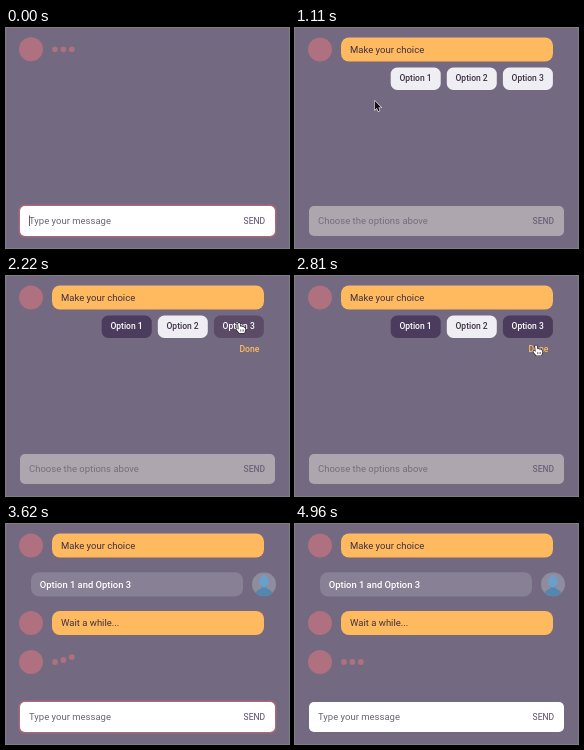
An HTML page with a canvas for the animation above (5960 ms loop, 283x220 px).

```html
<!DOCTYPE html>
<html lang="en">
<head>
<meta charset="utf-8">
<title>Chat choice</title>
<style>
  html, body { margin: 0; width: 100%; height: 100%; overflow: hidden; background: #736980; }
  canvas { display: block; width: 283px; height: 220px; }
</style>
</head>
<body>
<canvas id="stage"></canvas>
<script>
const W = 283, H = 220, LOOP = 5960;
const canvas = document.getElementById('stage');
const ctx = canvas.getContext('2d');
const ratio = Math.max(1, window.devicePixelRatio || 1);
canvas.width = W * ratio;
canvas.height = H * ratio;

const C = {
  bg: '#736980', orange: '#ffba5f', mauve: '#af7080', ink: '#3d3145',
  grey: '#888095', option: '#efeef2', hover: '#dfdbe3',
  picked: '#4b3b5d', pickedHover: '#5b4b67'
};

// Key moments, in ms
const T = { ask: 520, enter: 810, pick1: 1340, leave1: 1640, over3: 2040,
            pick3: 2220, leave3: 2510, overDone: 2810, reply: 2980,
            cursorOff: 3110, blur: 4900, still: 4960 };
const STEP = 1980 / 31;

const clamp = v => Math.max(0, Math.min(1, v));
const ease = v => v * v * (3 - 2 * v);
const stepped = (t, start, step) => Math.floor((t - start + 0.5) / step) * step;

function box(x, y, w, h, r, color) {
  ctx.fillStyle = color;
  ctx.beginPath();
  ctx.roundRect(x, y, w, h, r);
  ctx.fill();
}

function disc(x, y, r, color) {
  ctx.fillStyle = color;
  ctx.beginPath();
  ctx.arc(x, y, r, 0, Math.PI * 2);
  ctx.fill();
}

function label(text, x, y, color, size = 9.5, weight = 400) {
  ctx.font = `${weight} ${size}px Roboto, Arial, sans-serif`;
  ctx.fillStyle = color;
  ctx.fillText(text, x, y);
}

function botBubble(y, text) {
  disc(25, y + 12, 12, C.mauve);
  box(46, y, 212, 24, 8, C.orange);
  label(text, 55, y + 15.2, C.ink);
}

function userAvatar(x, y) {
  ctx.save();
  ctx.beginPath();
  ctx.arc(x, y, 12, 0, Math.PI * 2);
  ctx.clip();
  ctx.fillStyle = '#8f8c9e';
  ctx.fillRect(x - 12, y - 12, 24, 24);
  ctx.fillStyle = '#5487b0';
  ctx.beginPath();
  ctx.ellipse(x, y + 11, 9, 7, 0, 0, Math.PI * 2);
  ctx.fill();
  ctx.fillRect(x - 2.5, y, 5, 6);
  ctx.fillStyle = '#6a9fca';
  ctx.beginPath();
  ctx.ellipse(x, y - 3, 4.7, 6.2, 0, 0, Math.PI * 2);
  ctx.fill();
  ctx.restore();
}

// Each dot hops during the first 60% of its own cycle
function hop(ms) {
  const p = ms / 1030;
  if (p < 0) return 0;
  const q = p % 1;
  if (q >= 0.6) return 0;
  return 5 * ease(1 - Math.abs(q - 0.3) / 0.3);
}

function typing(y, ms) {
  disc(25, y, 12, C.mauve);
  for (let i = 0; i < 3; i++) disc(49 + i * 8.4, y - hop(ms - i * 155), 2.9, C.mauve);
}

function input(ring, caret) {
  if (ring > 0) {
    ctx.save();
    ctx.globalAlpha = ring;
    box(12, 176, 259, 34, 6.5, 'rgba(175,105,120,.42)');
    box(13, 177, 257, 32, 5.5, 'rgba(180,105,120,.72)');
    ctx.restore();
  }
  box(14, 178, 255, 30, 5, '#ffffff');
  label('Type your message', 23, 196.2, '#6b6570');
  label('SEND', 237.6, 195.6, '#57486a', 8.5);
  if (caret) {
    ctx.fillStyle = '#3b3540';
    ctx.fillRect(23, 187.5, 0.8, 10.5);
  }
}

function lockedInput() {
  box(14, 178, 255, 30, 5, '#aea6af');
  label('Choose the options above', 23, 196.2, '#776d7c');
  label('SEND', 237.6, 195.6, '#706379', 8.5, 500);
}

function option(n, picked, over) {
  const x = 95.7 + (n - 1) * 56.1;
  const color = picked ? (over ? C.pickedHover : C.picked) : (over ? C.hover : C.option);
  box(x, 39.5, 50, 22.5, 6.5, color);
  label('Option ' + n, x + 8.7, 53.4, picked ? '#ffffff' : C.ink, 8.5, 500);
}

function along(a, c, b, p) {
  const q = 1 - p;
  return [0, 1].map(i => q * q * a[i] + 2 * q * p * c[i] + p * p * b[i]);
}

const SPOT = { start: [8, 80], one: [126.5, 56], three: [233, 46.5], done: [241, 69] };

function cursorAt(t) {
  const move = (a, c, b, from, to) =>
    along(SPOT[a], c, SPOT[b], ease(clamp(stepped(t, from, 66) / (to - from))));
  if (t < T.leave1) return move('start', [65, 82], 'one', T.enter, T.pick1 - 70);
  if (t < T.leave3) return move('one', [172, 110], 'three', T.leave1, T.over3 - 4);
  return move('three', [240, 56], 'done', T.leave3, T.overDone - 36);
}

function shape(points, fill, line, width) {
  ctx.beginPath();
  points.forEach(([x, y], i) => i ? ctx.lineTo(x, y) : ctx.moveTo(x, y));
  ctx.closePath();
  ctx.lineJoin = 'round';
  ctx.strokeStyle = line;
  ctx.lineWidth = width;
  ctx.stroke();
  ctx.fillStyle = fill;
  ctx.fill();
}

function pointer([x, y], hand) {
  ctx.save();
  ctx.translate(x, y);
  if (hand) {
    shape([[-0.9, 0.9], [0, 0.3], [0.9, 0.9], [1.3, 4.2], [2.5, 3.7], [3.2, 4.6],
           [4.4, 4.2], [5, 5.2], [6, 5.2], [6.4, 7], [5.4, 10.5], [0.3, 10.5],
           [-2.6, 7], [-2.4, 6], [-1.2, 6.1], [-0.3, 7]], '#ffffff', '#211a28', 1.2);
    ctx.fillStyle = '#211a28';
    for (const dx of [1.3, 2.8, 4.2]) ctx.fillRect(dx, 7, 0.5, 2);
  } else {
    shape([[0.5, 0.8], [0.5, 10], [2.6, 8.1], [4.1, 11.3], [5.5, 10.6],
           [4.1, 7.6], [7, 7.4]], '#151019', '#ffffff', 1.1);
  }
  ctx.restore();
}

function choosing(t) {
  const pos = t >= T.enter ? cursorAt(t) : null;
  const inside = (x, y, w, h) =>
    pos && pos[0] >= x && pos[0] <= x + w && pos[1] >= y && pos[1] <= y + h;
  let hand = false;
  botBubble(9.5, 'Make your choice');
  for (let n = 1; n <= 3; n++) {
    const over = inside(95.7 + (n - 1) * 56.1, 39.5, 50, 22.5);
    hand = hand || over;
    option(n, (n === 1 && t >= T.pick1) || (n === 3 && t >= T.pick3), over);
  }
  if (t >= T.pick1) {
    label('Done', 233.4, 76, C.orange, 8.6, 500);
    hand = hand || inside(231, 66, 25, 14);
  }
  lockedInput();
  if (pos) pointer(pos, hand);
}

function waiting(t) {
  const ms = stepped(t, T.reply, STEP);
  botBubble(9.5, 'Make your choice');
  box(25, 48.2, 212, 24.2, 8, C.grey);
  label('Option 1 and Option 3', 33.8, 63.5, '#ffffff', 9.4, 500);
  userAvatar(258, 60.3);
  botBubble(87, 'Wait a while...');
  typing(138, t < T.still ? ms : -1);
  const ring = t < T.blur ? 1 : t < T.still ? 0.5 : 0;
  input(ring, t < T.blur && Math.floor((t - T.reply) / 400) % 2 === 0);
  if (t < T.cursorOff) pointer(SPOT.done, false);
}

function draw(t) {
  ctx.setTransform(ratio, 0, 0, ratio, 0, 0);
  ctx.fillStyle = C.bg;
  ctx.fillRect(0, 0, W, H);
  if (t < T.ask) {
    typing(21.3, stepped(t, 0, 65));
    input(1, t < 400);
  } else if (t < T.reply) {
    choosing(t);
  } else {
    waiting(t);
  }
}

function tick() {
  draw(performance.now() % LOOP);
  requestAnimationFrame(tick);
}
tick();
</script>
</body>
</html>
```
